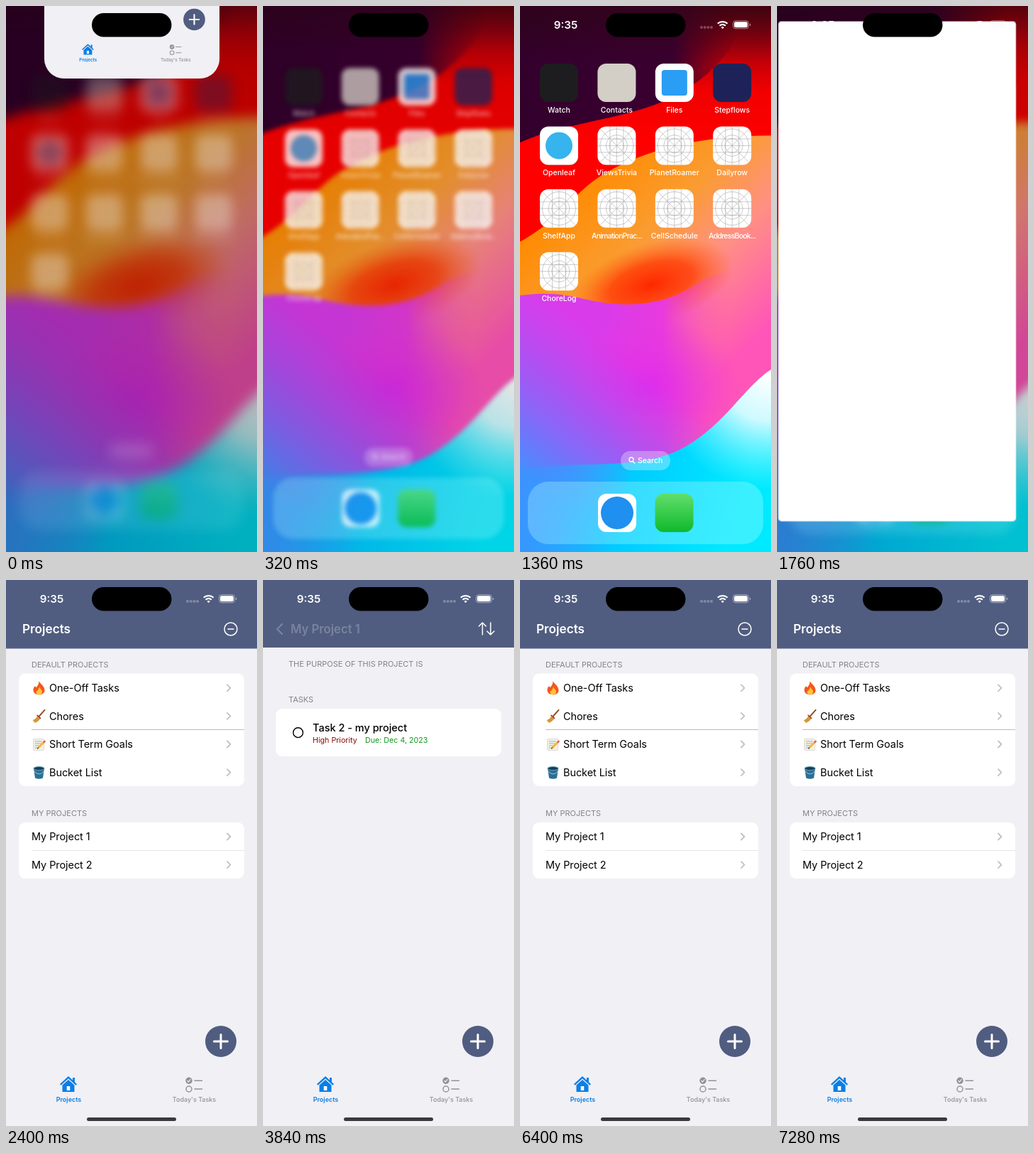
These frames come from a looping animation (354 px wide and 768 px high, 8000 ms). An HTML page:

```html
<!DOCTYPE html>
<html lang="en">
<head>
<meta charset="utf-8">
<title>To-do app</title>
<style>
html, body { margin: 0; width: 100%; height: 100%; overflow: hidden; background: #000; }
#stage { position: relative; width: 354px; height: 768px; overflow: hidden; }
#stage > *, #home > * { position: absolute; left: 0; top: 0; width: 354px; height: 768px; }
#home { overflow: hidden; }
#home > #wall { left: -30px; top: -30px; width: 414px; height: 828px; }
svg { display: block; }
text { font-family: Inter, Roboto, "Open Sans", sans-serif; white-space: pre; }
#app { overflow: hidden; transform-origin: 0 0; }

/* 1% of the loop is 80 ms */
#wall, #icons, #status, #app, #app g, #app rect, #app path { animation: 8s linear infinite; }

#wall { animation-name: wall; }
@keyframes wall {
  0%, 2% { transform: scale(1.13); filter: blur(8px) brightness(.75); animation-timing-function: cubic-bezier(.3, .6, .3, 1); }
  9%, 17.5% { transform: none; filter: blur(0) brightness(1); animation-timing-function: ease-out; }
  26%, 100% { transform: scale(1.13); filter: blur(8px) brightness(.75); }
}
#icons { animation-name: icons; }
@keyframes icons {
  0%, 2% { transform: scale(.947); filter: blur(9px); opacity: .38; animation-timing-function: cubic-bezier(.3, .6, .3, 1); }
  9%, 17.5% { transform: none; filter: blur(0); opacity: 1; animation-timing-function: ease-out; }
  26%, 100% { transform: scale(.947); filter: blur(9px); opacity: .38; }
}
#status { color: #fff; animation-name: status; }
@keyframes status {
  0%, 5% { opacity: 0; }
  9% { opacity: .88; }
  13%, 22% { opacity: 1; color: #fff; }
  23%, 25.5% { color: #000; }
  27%, 100% { opacity: 1; color: #fff; }
}
#app { animation-name: app; }
@keyframes app {
  0%, .99% { visibility: visible; transform: translate(54px, -434px) scale(.698); clip-path: inset(0 0 0 0 round 40px); }
  1%, 17.5% { visibility: hidden; transform: translate(28px, 346px) scale(.1525); clip-path: inset(0 0 414px 0 round 80px); }
  17.51% { visibility: visible; transform: translate(28px, 346px) scale(.1525); clip-path: inset(0 0 414px 0 round 80px); animation-timing-function: cubic-bezier(.25, .75, .25, 1); }
  26%, 100% { visibility: visible; transform: translate(0, 0) scale(1); clip-path: inset(0 0 0 0 round 0px); }
}
#app #cover { animation-name: cover; }
@keyframes cover { 0%, .99% { opacity: 0; } 1%, 17.6% { opacity: 1; } 20%, 100% { opacity: 0; } }
#app #splash { animation-name: splash; }
@keyframes splash { 0%, .99% { opacity: 0; } 1%, 25% { opacity: 1; } 28%, 100% { opacity: 0; } }
#app #bar { animation-name: bar; }
@keyframes bar { 0%, 24% { opacity: 0; } 27%, 100% { opacity: 1; } }

#app #listPage { animation-name: listPage; }
@keyframes listPage {
  0%, 37% { transform: none; animation-timing-function: cubic-bezier(.25, .75, .3, 1); }
  46%, 49% { transform: translate(-106px); animation-timing-function: cubic-bezier(.25, .75, .3, 1); }
  57%, 100% { transform: none; }
}
#app #taskPage { animation-name: taskPage; }
@keyframes taskPage {
  0%, 37% { transform: translate(354px); animation-timing-function: cubic-bezier(.25, .75, .3, 1); }
  46%, 49% { transform: none; animation-timing-function: cubic-bezier(.25, .75, .3, 1); }
  57%, 100% { transform: translate(354px); }
}
#app #dim { animation-name: dim; }
@keyframes dim { 0%, 37% { opacity: 0; } 44%, 49% { opacity: .1; } 56%, 100% { opacity: 0; } }
#app #listNav { animation-name: listNav; }
@keyframes listNav { 0%, 37% { opacity: 1; } 42%, 50% { opacity: 0; } 55%, 100% { opacity: 1; } }
#app #taskNav { animation-name: taskNav; }
@keyframes taskNav { 0%, 38% { opacity: 0; } 44%, 49% { opacity: 1; } 54%, 100% { opacity: 0; } }
#app #back { animation-name: back; }
@keyframes back {
  0%, 37% { transform: translate(90px); opacity: 1; animation-timing-function: cubic-bezier(.25, .75, .3, 1); }
  46%, 47.99% { transform: none; opacity: 1; }
  48%, 49% { transform: none; opacity: .24; animation-timing-function: cubic-bezier(.25, .75, .3, 1); }
  57%, 100% { transform: translate(90px); opacity: .6; }
}
#app #tap { animation-name: tap; }
@keyframes tap { 0%, 33.99% { opacity: 0; } 34%, 50% { opacity: 1; } 57%, 100% { opacity: 0; } }
</style>
</head>
<body>
<div id="stage">
  <div id="home">
    <svg id="wall" viewBox="-30 -30 414 828">
      <defs>
        <linearGradient id="red" gradientUnits="userSpaceOnUse" x1="0" y1="0" x2="0" y2="200">
          <stop stop-color="#5c0012"/><stop offset=".3" stop-color="#b0000c"/><stop offset=".6" stop-color="#f20000"/><stop offset="1" stop-color="#f00"/>
        </linearGradient>
        <linearGradient id="dark" gradientUnits="userSpaceOnUse" x1="0" y1="0" x2="310" y2="0">
          <stop stop-color="#33002c"/><stop offset=".7" stop-color="#3a0030"/><stop offset="1" stop-color="#4a0020" stop-opacity="0"/>
        </linearGradient>
        <linearGradient id="shade" x2="0" y2="1"><stop stop-color="#2c0610" stop-opacity=".8"/><stop offset="1" stop-color="#2c0610" stop-opacity="0"/></linearGradient>
        <linearGradient id="orange" gradientUnits="userSpaceOnUse" x1="100" y1="230" x2="330" y2="470">
          <stop stop-color="#ff8a00"/><stop offset=".35" stop-color="#fa9c30"/><stop offset=".62" stop-color="#ff9084"/><stop offset="1" stop-color="#ff55b8"/>
        </linearGradient>
        <radialGradient id="ember"><stop stop-color="#ff2800"/><stop offset=".5" stop-color="#ff3c00" stop-opacity=".8"/><stop offset="1" stop-color="#ff6000" stop-opacity="0"/></radialGradient>
        <linearGradient id="magenta" gradientUnits="userSpaceOnUse" x1="120" y1="0" x2="300" y2="0">
          <stop stop-color="#d93bea"/><stop offset=".45" stop-color="#e83ade"/><stop offset="1" stop-color="#ff55b8" stop-opacity="0"/>
        </linearGradient>
        <radialGradient id="glow"><stop stop-color="#e02cec"/><stop offset="1" stop-color="#e838dc" stop-opacity="0"/></radialGradient>
        <linearGradient id="blue" gradientUnits="userSpaceOnUse" x1="-10" y1="650" x2="125" y2="475">
          <stop stop-color="#3f92ff"/><stop offset="1" stop-color="#8a60ff" stop-opacity="0"/>
        </linearGradient>
        <linearGradient id="cyan" gradientUnits="userSpaceOnUse" x1="0" y1="660" x2="300" y2="740">
          <stop stop-color="#2f98ff" stop-opacity=".2"/><stop offset=".5" stop-color="#00ccff"/><stop offset="1" stop-color="#00eaff"/>
        </linearGradient>
        <radialGradient id="white" gradientUnits="userSpaceOnUse" cx="350" cy="520" r="160">
          <stop stop-color="#fff"/><stop offset=".4" stop-color="#e4fcff" stop-opacity=".9"/><stop offset="1" stop-color="#7ff6ff" stop-opacity="0"/>
        </radialGradient>
        <path id="low" d="M-30 412C30 400 60 405 90 412C150 426 205 422 250 390C280 370 320 370 384 380V798H-30Z"/>
        <path id="sea" d="M384 495C325 520 312 560 262 600C222 632 190 644 90 645C40 645 0 655-30 645V798H384Z"/>
      </defs>
      <path fill="url(#red)" d="M-30-30H384V500H-30Z"/>
      <path fill="url(#dark)" d="M-30-30H330C320 50 270 105 200 135C140 160 60 165 0 192L-30 204Z"/>
      <path fill="url(#shade)" d="M-30-30H384V80H-30Z"/>
      <path fill="url(#orange)" d="M-30 345C40 320 70 270 105 245C170 200 270 178 384 183V798H-30Z"/>
      <ellipse cx="185" cy="392" rx="120" ry="58" transform="rotate(-17 185 392)" fill="url(#ember)"/>
      <use href="#low" fill="url(#magenta)"/>
      <ellipse cx="180" cy="535" rx="130" ry="100" fill="url(#glow)"/>
      <use href="#low" fill="url(#blue)"/>
      <use href="#sea" fill="url(#cyan)"/>
      <use href="#sea" fill="url(#white)"/>
    </svg>
    <svg id="icons" viewBox="0 0 354 768">
      <defs>
        <g id="grid">
          <rect width="54" height="54" rx="12" fill="#fff"/>
          <g fill="none" stroke="#a6a6aa" stroke-width=".6">
            <circle cx="27" cy="27" r="23.5"/><circle cx="27" cy="27" r="15"/><circle cx="27" cy="27" r="10"/>
            <path d="M3 3L51 51M51 3L3 51M17.5 0V54M27 0V54M36.5 0V54M0 17.5H54M0 27H54M0 36.5H54"/>
          </g>
        </g>
        <linearGradient id="leaf" x2="0" y2="1"><stop stop-color="#62de6c"/><stop offset="1" stop-color="#0fb92c"/></linearGradient>
      </defs>
    </svg>
  </div>
  <div id="app"><svg id="appArt" viewBox="0 0 354 768"></svg></div>
  <svg id="status" viewBox="0 0 354 768">
    <text x="64.5" y="32.3" font-size="15.2" font-weight="600" text-anchor="middle" fill="currentColor">9:35</text>
    <g fill="currentColor" opacity=".28"><circle cx="256" cy="30" r="2"/><circle cx="260.7" cy="30" r="2"/><circle cx="265.4" cy="30" r="2"/><circle cx="270" cy="30" r="2"/></g>
    <g fill="none" stroke="currentColor" stroke-width="2.2">
      <path d="M278.8 24.8a10 10 0 0 1 13.8 0M281.5 27.7a6.2 6.2 0 0 1 8.4 0"/>
      <path d="M283.6 30a3 3 0 0 1 4.2 0L285.7 32.2Z" fill="currentColor" stroke="none"/>
      <rect x="300.5" y="20.8" width="22" height="11" rx="3.5" stroke-width="1" opacity=".5"/>
    </g>
    <rect x="302" y="22.3" width="19" height="8" rx="2.2" fill="currentColor"/>
    <path d="M324 24.5a2 2 0 0 1 0 3.8Z" fill="currentColor" opacity=".5"/>
  </svg>
  <svg viewBox="0 0 354 768"><rect x="121" y="10" width="112.5" height="33.5" rx="16.7"/></svg>
</div>
<script>
const fill = (id, art) => document.getElementById(id).insertAdjacentHTML('beforeend', art);
const text = (x, y, size, str, attrs = '') => `<text x="${x}" y="${y}" font-size="${size}" ${attrs}>${str}</text>`;
const box = (x, y, w, h, r, color, attrs = '') => `<rect x="${x}" y="${y}" width="${w}" height="${h}" rx="${r}" fill="${color}" ${attrs}/>`;
const dot = (x, y, r, color) => `<circle cx="${x}" cy="${y}" r="${r}" fill="${color}"/>`;
const line = (d, color, width) => `<path d="${d}" fill="none" stroke="${color}" stroke-width="${width}" stroke-linecap="round" stroke-linejoin="round"/>`;
const tile = color => box(0, 0, 54, 54, 12, color);
const at = (x, y, art) => `<g transform="translate(${x} ${y})">${art}</g>`;

// Home screen
const grid = '<use href="#grid"/>';
const apps = [
  ['Watch', tile('#1d1d1f')],
  ['Contacts', tile('#d3cec6')],
  ['Files', tile('#fff') + box(9, 9, 36, 36, 4, '#2a9df4')],
  ['Stepflows', tile('#1d2358')],
  ['Openleaf', tile('#fff') + dot(27, 27, 19, '#35b4ee')],
  ...['ViewsTrivia', 'PlanetRoamer', 'Dailyrow', 'ShelfApp', 'AnimationPrac...', 'CellSchedule', 'AddressBook...', 'ChoreLog'].map(n => [n, grid])
];
const label = 'text-anchor="middle" fill="#fff" font-weight="500"';
const appIcons = apps.map(([name, art], i) => {
  const x = 28 + (i % 4) * 81.4, y = 81 + Math.floor(i / 4) * 88.4;
  const tight = name.endsWith('...') ? ' letter-spacing="-.75"' : '';
  return at(x, y, art + text(27, 69, 10.5, name, label + tight));
}).join('');
fill('icons', appIcons
  + box(142, 626, 70, 27, 13.5, 'rgba(255,255,255,.3)')
  + line('M159 640.5L161.5 643M160 638a3 3 0 1 1-6 0a3 3 0 1 1 6 0', '#fff', 1.4)
  + text(166, 643, 10.5, 'Search', 'fill="#fff" font-weight="500"')
  + box(11, 669, 332, 88, 29, 'rgba(190,255,255,.3)')
  + at(110, 686, tile('#fff') + dot(27, 27, 23, '#1f8ff0'))
  + at(190.5, 686, tile('url(#leaf)')));

// To-do app
const slate = '#505d80', paper = '#f1f0f5';
const header = (y, str) => text(36, y, 11, str, 'fill="#838389"');
const row = (x, y, str) => text(x, y + 5.2, 14.5, str, 'letter-spacing="-.08"')
  + line(`M312 ${y - 4.5}L316.5 ${y}L312 ${y + 4.5}`, '#c1c1c5', 1.8);
const plus = dot(303, 649, 22, slate) + line('M293.5 649H312.5M303 639.5V658.5', '#fff', 3);
const title = 'fill="#fff" font-weight="600"';

const flame = `<path d="M9 0C11 4 17 7 17 13C17 17 13 19 9 19C5 19 1 17 1 12.5C1 10 2 8 3.5 7L5 9C7 7 9 4 9 0Z" fill="#f4571c"/>
  <path d="M9.5 8C10.5 11 13.5 12 13.5 15C13.5 17.5 11.5 19 9 19C6.5 19 4.5 17 5 14.5C7 14 8.5 11 9.5 8Z" fill="#ffc53a"/>`;
const broom = line('M17 1L9 10', '#8a4f2c', 2)
  + '<path d="M7 8L11.5 12C10 15 7 18 3 19L0 15C4 14 6 11 7 8Z" fill="#d9a441"/>'
  + line('M6.5 8.5L11 12.5', '#b5352a', 1.6) + line('M3 16L7 12M5 17L9 13', '#a8742a', .7);
const memo = box(1, 2, 15, 16, 1, '#f4f1e6', 'stroke="#c9c6ba" stroke-width=".6"')
  + line('M3.5 5.5H13M3.5 8.5H13M3.5 11.5H10M3.5 14.5H8', '#9aa4b0', .9)
  + line('M16.5 6L8.5 14', '#f2b632', 2.6) + line('M17 5.5L16 6.5', '#e0607a', 2.6) + line('M8 14.5L7 15.5', '#444', 1.2);
const bucket = line('M2 4C5 12 14 12 16 4', '#8fa3ad', 1)
  + '<path d="M1.5 4H16.5L14.5 17.5Q9 20 3.5 17.5Z" fill="#2b6f96"/><ellipse cx="9" cy="4" rx="7.5" ry="2.5" fill="#173f58" stroke="#5f9fbe"/>'
  + line('M2.5 8C6 13 13 13 15.5 8', '#a9c4d1', 1);

const listPage = box(0, 0, 354, 768, 0, paper)
  + header(123, 'DEFAULT PROJECTS') + box(18, 131.5, 318, 158.5, 9, '#fff')
  + [['One-Off Tasks', flame], ['Chores', broom], ['Short Term Goals', memo], ['Bucket List', bucket]]
    .map(([str, art], i) => { const y = 151.8 + i * 39.6; return at(37.5, y - 9.5, art) + row(61, y, str); }).join('')
  + box(36, 210, 300, 1, 0, '#bcbcc0')
  + header(332, 'MY PROJECTS') + box(18, 341, 318, 79, 9, '#fff')
  + '<path id="tap" d="M18 380V350a9 9 0 0 1 9-9H327a9 9 0 0 1 9 9V380Z" fill="#d1d1d6"/>'
  + row(36, 361, 'My Project 1') + row(36, 400.6, 'My Project 2') + box(36, 380, 300, .7, 0, '#dcdce0')
  + plus + box(0, 0, 354, 768, 0, '#000', 'id="dim"');

const taskPage = box(0, 0, 354, 768, 0, paper)
  + header(122, 'THE PURPOSE OF THIS PROJECT IS') + header(172, 'TASKS') + box(18, 181, 318, 67, 9, '#fff')
  + '<circle cx="49.5" cy="214.7" r="6.9" fill="none" stroke="#000" stroke-width="1.4"/>'
  + text(70, 213, 14.5, 'Task 2 - my project', 'font-weight="500"')
  + text(70, 228.5, 10.7, 'High Priority', 'fill="#8b0a0a"') + text(144, 228.5, 10.7, 'Due: Dec 4, 2023', 'fill="#0d9a1a"')
  + plus;

const listNav = text(23, 75.2, 17.2, 'Projects', title)
  + line('M326 69a9 9 0 1 1-18 0a9 9 0 1 1 18 0M313 69H321', '#fff', 1.5);
const taskNav = box(0, 95, 354, 2, 0, paper)
  + `<g id="back">${line('M27 62L20 69L27 76', '#fff', 2.2)}${text(39, 75, 16.7, 'My Project 1', title)}</g>`
  + line('M309.5 77V60M304.5 65L309.5 60L314.5 65M321 60V77M316 72L321 77L326 72', '#fff', 1.5);

const accent = '#0a7fe6', muted = '#929297';
const tabs = `<path d="M88 698L76 709L77.5 710.7L88 701.3L98.5 710.7L100 709L97 706.2V700H94V703.5Z" fill="${accent}"/>
  <path d="M88 703L79.5 710.5V720H96.5V710.5Z" fill="${accent}"/>` + box(85.7, 712, 4.6, 6, 0, '#fff')
  + text(88.5, 734, 9, 'Projects', `text-anchor="middle" fill="${accent}" font-weight="600"`)
  + dot(258, 704.3, 4.7, muted) + line('M256 704.5L257.5 706L260.2 702.5', '#fff', 1.1)
  + line('M262 716a4 4 0 1 1-8 0a4 4 0 1 1 8 0M266 704.3H276.5M266 716H276.5', muted, 1.5)
  + text(265.5, 734, 9, "Today's Tasks", `text-anchor="middle" fill="${muted}" font-weight="500"`);

fill('appArt', `<g id="listPage">${listPage}</g><g id="taskPage">${taskPage}</g>`
  + box(0, 0, 354, 96.5, 0, slate)
  + `<g id="listNav">${listNav}</g><g id="taskNav">${taskNav}</g>` + tabs
  + box(0, 0, 354, 768, 0, '#fff', 'id="splash"')
  + box(114, 756, 126, 5, 2.5, '#3a3a3e', 'id="bar"')
  + `<g id="cover"><g transform="scale(6.555)">${grid}</g></g>`);
</script>
</body>
</html>
```
